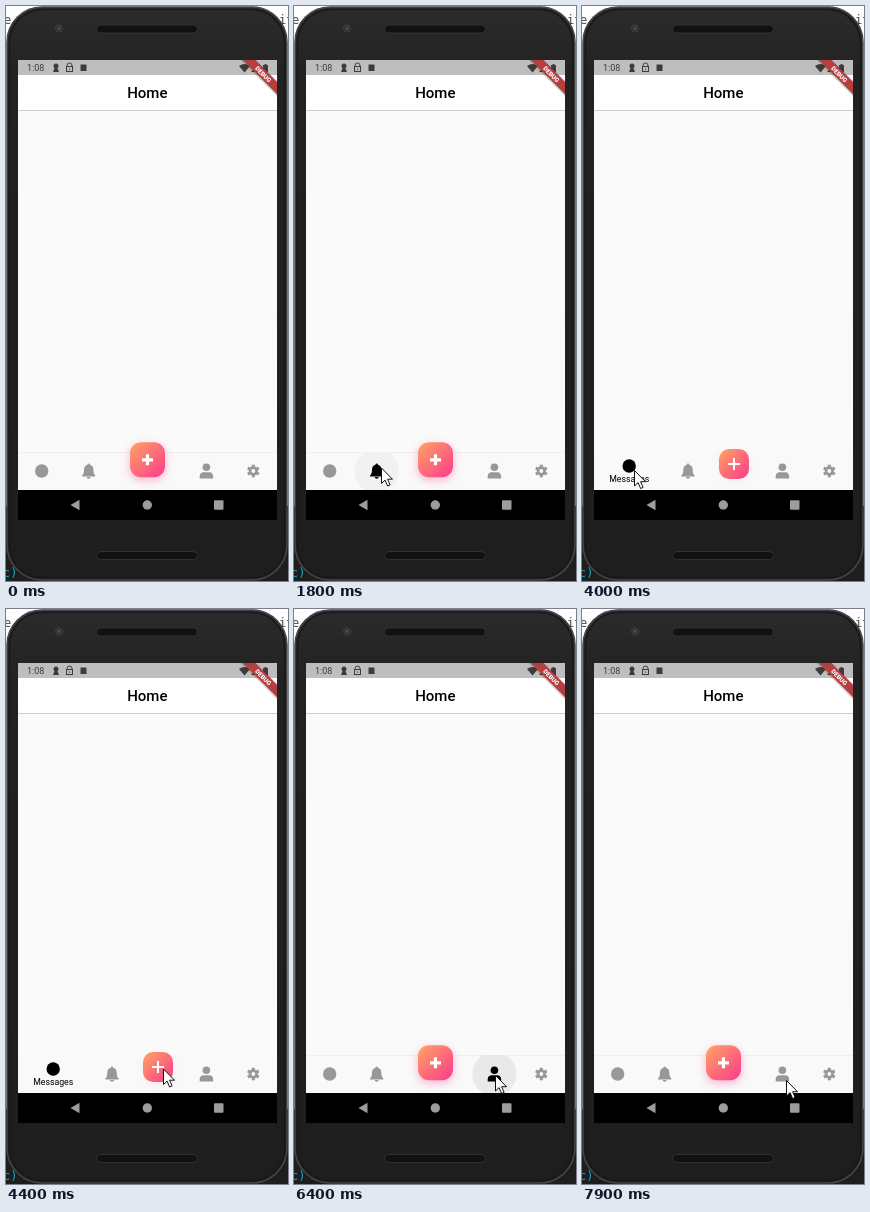
An HTML page for the animation above (8 s loop, 282 by 575 pixels).

```html
<!DOCTYPE html>
<html lang="en">
<head>
<meta charset="utf-8">
<title>Navigation bar</title>
<style>
  html, body { margin: 0; width: 100%; height: 100%; overflow: hidden; background: #fff; }
  svg { display: block; width: 282px; height: 575px; }
  text { font-family: Roboto, sans-serif; }
  .label { font-size: 8.75px; text-anchor: middle; }
  .code { font: 12px "DejaVu Sans Mono", monospace; }
</style>
</head>
<body>
<svg viewBox="0 0 282 575">
  <defs>
    <linearGradient id="warm" x1="0" y1="0" x2="1" y2="1">
      <stop offset="0" stop-color="#ffa463"/>
      <stop offset="1" stop-color="#fb3a8c"/>
    </linearGradient>
    <linearGradient id="shell" x1="0" y1="0" x2="0" y2="1">
      <stop offset="0" stop-color="#2b2b2b"/>
      <stop offset=".12" stop-color="#222"/>
      <stop offset="1" stop-color="#1e1e1e"/>
    </linearGradient>
    <filter id="soft" x="-60%" y="-60%" width="220%" height="220%"><feGaussianBlur stdDeviation="5"/></filter>
    <clipPath id="screen"><rect x="12" y="54" width="259" height="460"/></clipPath>
    <clipPath id="bar"><rect x="12" y="446" width="259" height="38"/></clipPath>
  </defs>

  <!-- desktop behind the phone -->
  <rect width="282" height="575" fill="#fff"/>
  <rect y="500" width="282" height="75" fill="#1e1e1e"/>
  <text class="code" x="-2" y="18" fill="#444">e</text>
  <text class="code" x="273" y="18" fill="#444">it</text>

  <!-- phone -->
  <rect x="1" y="1" width="280" height="573" rx="35" fill="url(#shell)" stroke="#474747" stroke-width="1.5"/>
  <rect x="3.5" y="3.5" width="275" height="568" rx="33" fill="none" stroke="#191919" stroke-width="1.5"/>
  <text class="code" x="-3" y="571" fill="#1c9fc4" font-style="italic">c)</text>
  <circle cx="53" cy="22.500" r="3.500" fill="#333" stroke="#3f3f3f"/>
  <circle cx="53" cy="22.500" r="1.300" fill="#555"/>
  <g fill="#111" stroke="#303030">
    <rect x="90.500" y="19" width="101" height="8" rx="4"/>
    <rect x="90.500" y="545.500" width="101" height="8" rx="4"/>
  </g>

  <!-- app -->
  <g clip-path="url(#screen)">
    <rect x="12" y="54" width="259" height="430" fill="#fafafa"/>
    <rect x="12" y="54" width="259" height="15" fill="#bebebe"/>
    <rect x="12" y="69" width="259" height="35" fill="#fff"/>
    <rect x="12" y="104" width="259" height="1" fill="#cfcfcf"/>
    <text x="141.300" y="92" font-size="15" font-weight="500" text-anchor="middle">Home</text>

    <g fill="#3c3c3c">
      <text x="21" y="65" font-size="9">1:08</text>
      <circle cx="50" cy="60" r="2.500"/>
      <path d="M49 61h2l2 5h-6z"/>
      <path d="M61 61v-1.500a2.500 2.500 0 0 1 5 0V61" fill="none" stroke="#3c3c3c"/>
      <rect x="60.500" y="60.500" width="6" height="5" fill="none" stroke="#3c3c3c"/>
      <rect x="63" y="62.500" width="1.200" height="1.200"/>
      <rect x="74.500" y="58.500" width="6" height="6.500"/>
      <path d="M233 60q5.500-4 11 0l-5.500 6.500z"/>
      <path d="M253 57.500v8.500h-8z"/>
      <path d="M257 59h1.500v-1h2v1h1.500v7.500h-5z"/>
    </g>
    <g transform="translate(257.300 68.300) rotate(45)">
      <rect x="-40" y="-5" width="80" height="11" fill="#000" opacity=".16"/>
      <rect x="-40" y="-4.500" width="80" height="9" fill="#b53e3e"/>
      <text y="2.200" font-size="6.200" font-weight="900" fill="#fff" text-anchor="middle">DEBUG</text>
    </g>

    <!-- bottom bar -->
    <rect x="12" y="446" width="259" height="38" fill="#f9f9f9"/>
    <rect id="edge" x="12" y="446" width="259" height="1" fill="#efefef"/>
    <circle id="splash" cy="465" clip-path="url(#bar)"/>
    <g id="items">
      <g><circle r="6.700"/></g>
      <g>
        <path d="M0-7.500a1.200 1.200 0 0 1 1.200 1.300C3.700-5.600 4.700-3.600 4.700-1.200c0 3.200.6 4.200 1.900 5.700v.9H-6.600v-.9c1.300-1.500 1.900-2.500 1.900-5.700 0-2.400 1-4.400 3.500-5A1.200 1.200 0 0 1 0-7.500z"/>
        <path d="M-2 6h4a2 1.700 0 0 1-4 0z"/>
      </g>
      <g>
        <circle cy="-3.700" r="3.800"/>
        <path d="M-6.700 7.500V5.200C-6.700 2.600-5 1.300-2.800 1.300h5.600C5 1.300 6.700 2.600 6.700 5.200v2.300z"/>
      </g>
      <g>
        <circle r="3.300" fill="none" stroke="currentColor" stroke-width="2.700"/>
        <g id="teeth"></g>
      </g>
    </g>
    <text class="label" y="475.500">Messages</text>
    <text class="label" y="475.500">Notifications</text>
    <text class="label" y="475.500">Profile</text>

    <rect id="glow" fill="#f0509a" filter="url(#soft)"/>
    <rect id="button" fill="url(#warm)"/>
    <path id="plus" stroke="#fff" fill="none"/>

    <!-- system bar -->
    <rect x="12" y="484" width="259" height="30" fill="#000"/>
    <g fill="#9d9d9d">
      <path d="M64.500 499l9-5.200v10.400z"/>
      <circle cx="141.300" cy="499" r="4.700"/>
      <rect x="208" y="494.300" width="9.500" height="9.500" rx="1"/>
    </g>
  </g>

  <path id="cursor" d="M.5.5v15.500l3.600-3.400 2.500 5.900 2.500-1.100-2.500-5.700h4.900z" fill="#fff" stroke="#111"/>
</svg>

<script>
const $ = id => document.getElementById(id);
const items = [...$('items').children];
const labels = [...document.querySelectorAll('.label')];
const LOOP = 8000, STEP = 100;

$('teeth').innerHTML = [0, 60, 120].map(a =>
  `<rect x="-1.500" y="-6.300" width="3" height="2.800" transform="rotate(${a})"/>
   <rect x="-1.500" y="-6.300" width="3" height="2.800" transform="rotate(${a + 180})"/>`).join('');

// Centres for each layout: messages, bell, profile, settings, button
const layouts = {
  home:     [35.7, 82.7, 200.4, 247.3, 141.5],
  messages: [47.2, 106, 200.4, 247.3, 152],
  bell:     [35.7, 94.2, 200.4, 247.3, 152],
  profile:  [35.7, 82.7, 188.8, 247.3, 131]
};
const tabs = ['messages', 'bell', 'profile'];

// [start, end, layout]
const moves = [
  [-1, 0, 'home'], [1800, 2100, 'bell'], [3600, 3800, 'messages'],
  [4900, 5200, 'home'], [6500, 6900, 'profile'], [7200, 7500, 'home']
];
// [time, highlighted tab]
const inks = [[0, -1], [1800, 1], [3700, 0], [5100, -1], [6200, 2], [7400, -1]];
// [time, x, y]
const path = [
  [0, -30, -30], [99, -30, -30], [100, 0, 0], [900, 70, 466], [1200, 87, 461.5],
  [2200, 87, 461.5], [2400, 90, 466], [2600, 76, 466], [2700, 76, 466], [2800, 68, 470],
  [3200, 44, 463], [3900, 44, 463], [4000, 52, 464], [4400, 157, 459.5], [5400, 157, 459.5],
  [5900, 201, 466], [6700, 201, 466], [7000, 142, 458], [7500, 142, 458], [7900, 204, 471]
];

const mix = (a, b, p) => a + (b - a) * p;
const clamp = v => Math.max(0, Math.min(1, v));
const ease = p => p * p * (3 - 2 * p);
const latest = (list, t) => list.filter(k => k[0] <= t).pop();
const set = (el, attrs) => { for (const k in attrs) el.setAttribute(k, attrs[k]); };

function pointer(t) {
  const n = path.findIndex(k => k[0] > t);
  if (n < 0) return path[path.length - 1].slice(1);
  const a = path[n - 1], b = path[n];
  const p = ease((t - a[0]) / (b[0] - a[0]));
  return [mix(a[1], b[1], p), mix(a[2], b[2], p)];
}

function drawSplash(t) {
  const first = t >= 1800 && t < 2100, second = t >= 6200 && t < 6900;
  const fade = first ? 1 - (t - 1800) / 300 : 1 - clamp((t - 6500) / 400);
  set($('splash'), {
    cx: first ? 82.7 : 200.4,
    r: first ? 22 : 22 * clamp((t - 6100) / 300),
    fill: first ? '#f1f1f1' : '#e9e9e9',
    opacity: first || second ? fade : 0
  });
}

function drawButton(x, open) {
  const size = mix(35, 30, open), y = mix(453.8, 458, open), arm = mix(5.5, 6, open);
  const box = { x: x - size / 2, y: y - size / 2, width: size, height: size, rx: mix(11, 10, open) };
  set($('button'), box);
  set($('glow'), { ...box, y: box.y + 3, opacity: mix(.4, .06, open) });
  set($('plus'), {
    d: `M${x - arm} ${y}h${2 * arm}M${x} ${y - arm}v${2 * arm}`,
    'stroke-width': mix(3.2, 2, open)
  });
  set($('edge'), { opacity: 1 - open });
}

function draw(t) {
  const move = latest(moves, t);
  const from = (moves[moves.indexOf(move) - 1] || move)[2], to = move[2];
  const p = ease(clamp((t - move[0]) / (move[1] - move[0])));
  const xs = layouts.home.map((_, i) => mix(layouts[from][i], layouts[to][i], p));
  const weight = name => (from === name ? 1 - p : 0) + (to === name ? p : 0);
  const ink = latest(inks, t)[1];

  items.forEach((el, i) => {
    const lift = i < 3 ? clamp(weight(tabs[i])) : 0;
    const color = i === ink ? '#000' : '#989898';
    set(el, { transform: `translate(${xs[i]} ${465 - 5 * lift})`, fill: color, color });
    if (labels[i]) set(labels[i], { x: xs[i], opacity: from === to ? 0 : lift });
  });
  drawSplash(t);
  drawButton(xs[4], 1 - (from === to ? 1 : weight('home')));
  set($('cursor'), { transform: `translate(${pointer(t)})` });
}

function tick(now) {
  draw(Math.floor((now % LOOP) / STEP) * STEP);
  requestAnimationFrame(tick);
}
draw(0);
requestAnimationFrame(tick);
</script>
</body>
</html>
```
